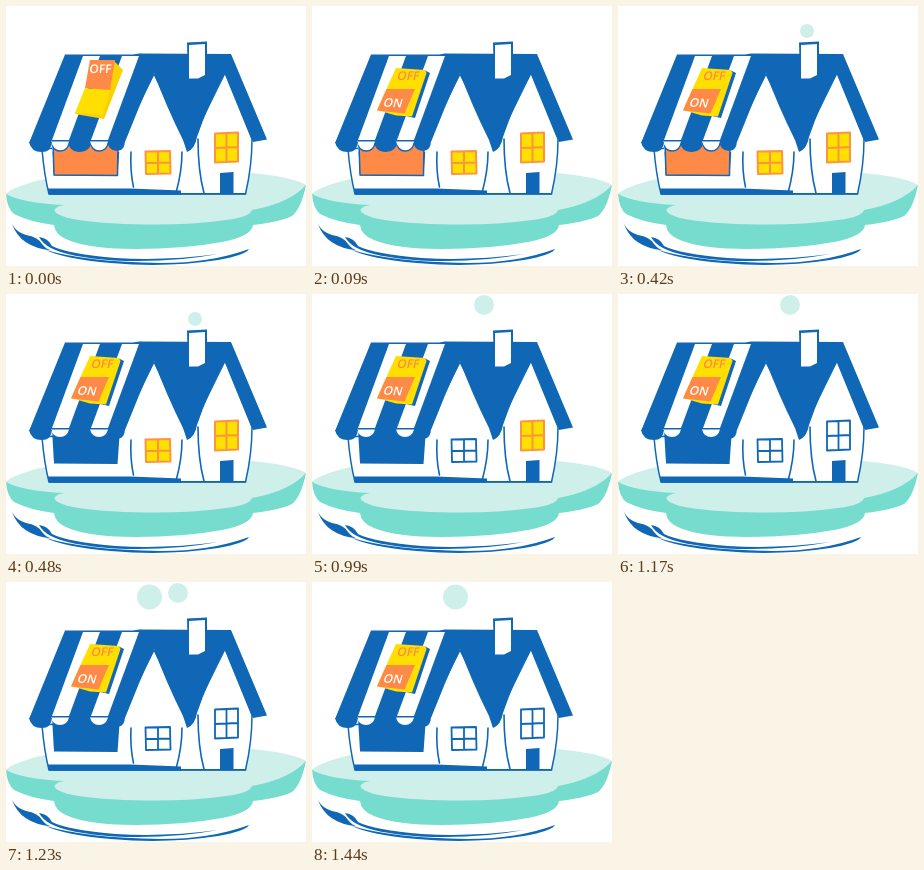
Write an HTML page that moves like this. It is 300 by 260 pixels and loops after 1800 ms.

```html
<!DOCTYPE html>
<html lang="en">
<head>
<meta charset="utf-8">
<title>House switch</title>
<style>
  html, body { margin: 0; width: 100%; height: 100%; overflow: hidden; background: #fff; }
  svg { display: block; width: 100vw; height: 100vh; }
  text { font: 600 12px "Open Sans", "Noto Sans", sans-serif; }
  .blue { fill: #0f67b5; }
  .white { fill: #fff; }
  .orange { fill: #ff8a48; }
  .yellow { fill: #ffdf00; }
  .gold { fill: #f9d200; }
  .line { fill: none; stroke: #0f67b5; stroke-width: 1.6; stroke-linejoin: round; stroke-linecap: round; }
  .edged { stroke: #0f67b5; stroke-width: 1.5; stroke-linejoin: round; }
  .lit { fill: #ffe100; stroke: #ff9440; stroke-width: 2; stroke-linejoin: round; }
  .dark { fill: #fff; stroke: #0f67b5; stroke-width: 1.8; stroke-linejoin: round; }
  .smoke { fill: #cfefea; }

  .step { animation: 1.8s step-end infinite; }
  .off { animation-name: off; }
  .on { animation-name: on; }
  .shop { animation-name: shop; }
  .left { animation-name: left; }
  .right { animation-name: right; }
  .puff1 { animation-name: puff1; }
  .puff2 { animation-name: puff2; }
  .puff3 { animation-name: puff3; }
  @keyframes off { 0% { opacity: 1 } 5%, 100% { opacity: 0 } }
  @keyframes on { 0% { opacity: 0 } 5%, 100% { opacity: 1 } }
  @keyframes shop { 0% { opacity: 1 } 26.666%, 100% { opacity: 0 } }
  @keyframes left { 0% { opacity: 1 } 46.666%, 100% { opacity: 0 } }
  @keyframes right { 0% { opacity: 1 } 65%, 100% { opacity: 0 } }
  @keyframes puff1 { 0% { opacity: 0 } 23.333% { opacity: 1 } 55%, 100% { opacity: 0 } }
  @keyframes puff2 { 0% { opacity: 0 } 48.333% { opacity: 1 } 80%, 100% { opacity: 0 } }
  @keyframes puff3 { 0% { opacity: 0 } 68.333%, 100% { opacity: 1 } }
</style>
</head>
<body>
<svg viewBox="0 0 300 260">
  <defs>
    <path id="pane-left" d="M139.500 145.500L164 145L164.500 167.500L140 168ZM152 145.500V168M140 157L164 156.500"/>
    <path id="pane-right" d="M209 127.500L232 126.500V155.500L209 156.500ZM220.500 127V156M209 142L232 141"/>
  </defs>

  <!-- ice -->
  <path fill="#76dccd" d="M0 188Q1 202 8 208Q24 216 48 219Q49 229 62 234Q84 243 130 243Q178 243 216 236Q246 230 247 219Q274 216 286 210Q295 203 300 179Z"/>
  <path fill="#cfefea" d="M0 188C12 176 70 163 150 163C235 163 287 170 300 179Q284 197 246 204Q244 211 220 214Q185 219 140 218.500Q92 218 62 212Q46 207 49 203Q51 200 58 199Q16 197 0 188Z"/>

  <!-- ripples -->
  <path class="blue" d="M6 218Q10 226 20 229Q32 231 36 238Q40 243 45 244.500Q14 241 6 218Z"/>
  <path class="blue" d="M33 231Q42 232 46 240Q62 248 110 252Q160 255 212 248Q165 257 108 254.500Q62 251 45 242Q37 238 33 231Z"/>
  <path class="blue" d="M40 244Q80 256 155 257Q205 257 243 243Q240 249 212 254Q160 262 105 257Q58 253 40 244Z"/>

  <!-- walls -->
  <path class="white edged" d="M36 143Q38 168 43 188H239.500Q246 160 246 133L219 67L183 140L148 68L113 138Z"/>
  <path class="blue" d="M42 182.500L124 182.500L175 184.500V188.800H43Z"/>
  <path class="line" d="M175 187.800H239.500"/>

  <!-- roof -->
  <path class="blue" d="M59 48.500L127 48.500L133 47.500L225 48L261 133.500L247 136L219 67Q203 96 191 131Q189 143 181 146L177 134Q160 100 148 67Q133 100 119 136L23 137Z"/>
  <path class="white" d="M77 50H94L63 134H46Z"/>
  <path class="white" d="M116 50H133L102 134H85Z"/>

  <!-- shop -->
  <path class="blue" d="M46 135H114L111.500 170L48 169.500Z"/>
  <g class="step shop">
    <path class="white" d="M46 136H115V146H46Z"/>
    <path class="orange edged" d="M47 137H112L111.500 169.500L48 169Z"/>
    <path class="blue" d="M62 135H86Q84 146 74 146Q63 146 62 135Z"/>
    <path class="white edged" d="M46 136Q46 145 54.500 145Q62 145 63 136M85 136Q85 145 93.500 145Q101 145 102 136"/>
  </g>
  <path class="blue" d="M101 134H119Q119 145 111 145Q102 145 101 134Z"/>
  <path class="white" d="M45 135.500H63Q61 143 54 143Q47 143 45 135.500Z"/>
  <path class="white" d="M84 135.500H102Q100 143 93 143Q86 143 84 135.500Z"/>
  <path class="blue" d="M23 136H46Q45 146 36 146Q25 146 23 136Z"/>

  <!-- gable walls and door -->
  <path class="line" d="M125 146Q124 165 127.500 181M176 146Q176 165 170 187M192 133Q192 165 198 187"/>
  <path class="blue" d="M214 167L227.500 166V188H214Z"/>

  <!-- chimney -->
  <path class="blue" d="M181 36.500L201 35.500V73H182Z"/>
  <path class="white" d="M183 39L199 38V69L192 72.500H183Z"/>

  <!-- windows -->
  <use class="dark" href="#pane-left"/>
  <use class="dark" href="#pane-right"/>
  <g class="step left">
    <path class="white" d="M138 143H167V170H138Z"/>
    <use class="lit" href="#pane-left"/>
  </g>
  <g class="step right">
    <path class="white" d="M207 125H234V159H207Z"/>
    <use class="lit" href="#pane-right"/>
  </g>

  <!-- switch -->
  <g class="step off">
    <path class="gold" d="M107 54L117 64L98 113L69 108Z"/>
    <path class="yellow" d="M79 82L104 84L97 109L69 107Z"/>
    <path class="orange" d="M84 54H109L104 84L79 82Z"/>
    <text class="white" transform="translate(83 67) skewX(-6)">OFF</text>
  </g>
  <g class="step on">
    <path class="blue" d="M112 64L118 67L103 112L94 110Z"/>
    <path class="yellow" d="M84 62L113 64L114.500 67L100 110.500L84 109.500L65 104Z"/>
    <path class="orange" d="M74.500 83H103L92.500 107.500L65 104.500Z"/>
    <text class="orange" transform="translate(84.500 74) skewX(-12)">OFF</text>
    <text class="white" transform="translate(70.500 100.500) rotate(3) skewX(-14)">ON</text>
  </g>

  <!-- smoke -->
  <circle class="smoke step puff1" cx="189" cy="25" r="7"/>
  <circle class="smoke step puff2" cx="172" cy="11" r="10"/>
  <circle class="smoke step puff3" cx="143.500" cy="15" r="12.500"/>
</svg>
</body>
</html>
```
